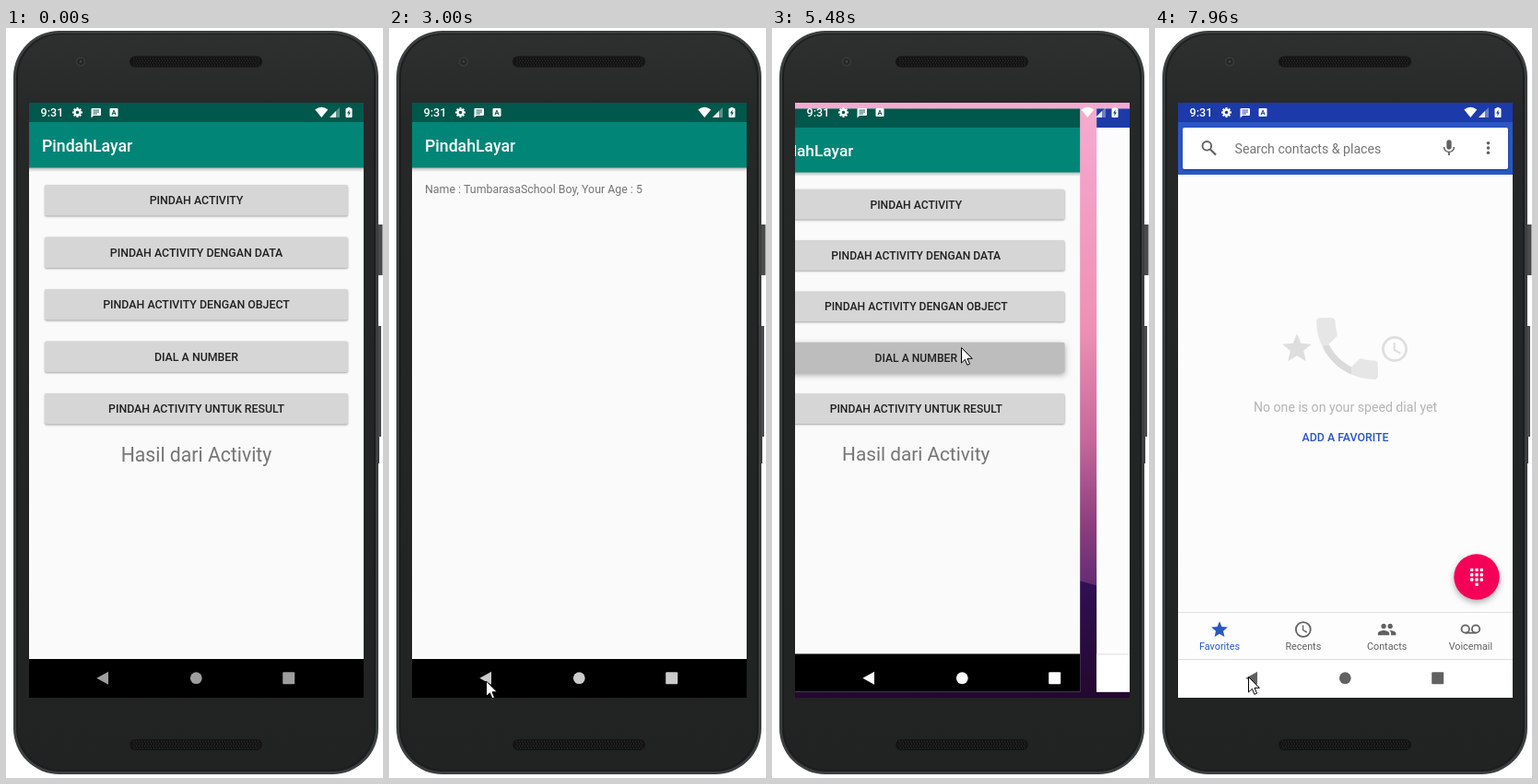
Animation, 409 px wide and 813 px high, one loop 8 s. Source, as an HTML page with a canvas:

```html
<!DOCTYPE html>
<html lang="id">
<head>
<meta charset="utf-8">
<title>Phone demo</title>
<style>
html, body { margin: 0; width: 100%; height: 100%; overflow: hidden; background: #fff; }
canvas { display: block; width: 409px; height: 813px; }
</style>
</head>
<body>
<canvas id="stage"></canvas>
<script>
const W = 409, H = 813, LOOP = 8000;
const SX = 25, SY = 81, SW = 363, SH = 645;
const BLUE = '#2a56c6', GREY = '#616161';
const canvas = document.getElementById('stage');
const ctx = canvas.getContext('2d');
const dpr = window.devicePixelRatio || 1;
canvas.width = W * dpr;
canvas.height = H * dpr;

const ICONS = {
  person: 'M15 12a4 4 0 1 0 0-8 4 4 0 0 0 0 8zM6 10V7H4v3H1v2h3v3h2v-3h3v-2zM15 14c-2.67 0-8 1.34-8 4v2h16v-2c0-2.66-5.33-4-8-4z',
  chat: 'M20 2H4a2 2 0 0 0-2 2v18l4-4h14a2 2 0 0 0 2-2V4a2 2 0 0 0-2-2zM6 9h12v2H6zM18 14H6v-2h12zM18 8H6V6h12z',
  star: 'M12 17.27L18.18 21l-1.64-7.03L22 9.24l-7.19-.61L12 2 9.19 8.63 2 9.24l5.46 4.73L5.82 21z',
  clock: 'M12 2a10 10 0 1 0 0 20 10 10 0 1 0 0-20zM12 4a8 8 0 1 1 0 16 8 8 0 1 1 0-16zM11 7h1.5v5.25l4.5 2.67-.75 1.23L11 13z',
  people: 'M16 11a3 3 0 1 0-3-3 3 3 0 0 0 3 3zM8 11a3 3 0 1 0-3-3 3 3 0 0 0 3 3zM8 13c-2.33 0-7 1.17-7 3.5V19h14v-2.5C15 14.17 10.33 13 8 13zM16 13l-1 .05c1.2.84 2 1.97 2 3.45V19h6v-2.5c0-2.33-4.67-3.5-7-3.5z',
  mic: 'M12 14a3 3 0 0 0 3-3V5a3 3 0 0 0-6 0v6a3 3 0 0 0 3 3zM17.3 11a5.3 5.3 0 0 1-10.6 0H5a7 7 0 0 0 6 6.7V21h2v-3.3a7 7 0 0 0 6-6.7z',
  erase: 'M22 3H7L0 12l7 9h15a2 2 0 0 0 2-2V5a2 2 0 0 0-2-2zM19 15.6 17.6 17 14 13.4 10.4 17 9 15.6 12.6 12 9 8.4 10.4 7 14 10.6 17.6 7 19 8.4 15.4 12z',
  phone: 'M6.62 10.79c1.44 2.83 3.76 5.14 6.59 6.59l2.2-2.2c.27-.27.67-.36 1.02-.24 1.12.37 2.33.57 3.57.57.55 0 1 .45 1 1V20c0 .55-.45 1-1 1-9.39 0-17-7.61-17-17 0-.55.45-1 1-1h3.5c.55 0 1 .45 1 1 0 1.25.2 2.45.57 3.57.11.35.03.74-.25 1.02z',
  pointer: 'M0 0V16.5L3.9 12.8 6.4 18.8 9 17.7 6.5 11.8H11.8z'
};
for (const k in ICONS) ICONS[k] = new Path2D(ICONS[k]);

const clamp = v => Math.max(0, Math.min(1, v));
const span = (t, a, d) => clamp((t - a) / d);
const smooth = u => u * u * (3 - 2 * u);
const easeOut = u => 1 - Math.pow(1 - u, 4);

function rect(x, y, w, h, color) {
  ctx.fillStyle = color;
  ctx.fillRect(x, y, w, h);
}
function round(x, y, w, h, r, color) {
  ctx.fillStyle = color;
  ctx.beginPath();
  ctx.roundRect(x, y, w, h, r);
  ctx.fill();
}
function disc(x, y, r, color) {
  ctx.fillStyle = color;
  ctx.beginPath();
  ctx.arc(x, y, r, 0, 7);
  ctx.fill();
}
function poly(color, ...p) {
  ctx.fillStyle = color;
  ctx.beginPath();
  for (let i = 0; i < p.length; i += 2) ctx.lineTo(p[i], p[i + 1]);
  ctx.fill();
}
function ring(x, y, r, width, color) {
  ctx.strokeStyle = color;
  ctx.lineWidth = width;
  ctx.beginPath();
  ctx.arc(x, y, r, 0, 7);
  ctx.stroke();
}
function line(x1, y1, x2, y2, width, color) {
  ctx.strokeStyle = color;
  ctx.lineWidth = width;
  ctx.beginPath();
  ctx.moveTo(x1, y1);
  ctx.lineTo(x2, y2);
  ctx.stroke();
}
function text(s, x, y, size, color, weight = 400, align = 'left') {
  ctx.font = `${weight} ${size}px Roboto, sans-serif`;
  ctx.textAlign = align;
  ctx.fillStyle = color;
  ctx.fillText(s, x, y);
}
function icon(name, cx, cy, size, color) {
  ctx.save();
  ctx.translate(cx - size / 2, cy - size / 2);
  ctx.scale(size / 24, size / 24);
  ctx.fillStyle = color;
  ctx.fill(ICONS[name], 'evenodd');
  ctx.restore();
}
function shadowed(blur, dy, alpha, paint) {
  ctx.save();
  ctx.shadowColor = `rgba(0,0,0,${alpha})`;
  ctx.shadowBlur = blur * dpr;
  ctx.shadowOffsetY = dy * dpr;
  paint();
  ctx.restore();
}
function clipped(x, y, w, h, paint) {
  ctx.save();
  ctx.beginPath();
  ctx.rect(x, y, w, h);
  ctx.clip();
  paint();
  ctx.restore();
}
function placed(x, y, paint, s = 1) {
  ctx.save();
  ctx.translate(SX + SW / 2 + x, SY + SH / 2 + y);
  ctx.scale(s, s);
  ctx.translate(-SX - SW / 2, -SY - SH / 2);
  paint();
  ctx.restore();
}
function faded(alpha, paint) {
  ctx.save();
  ctx.globalAlpha = alpha;
  paint();
  ctx.restore();
}
function gradient(y1, y2, stops) {
  const g = ctx.createLinearGradient(0, y1, 0, y2);
  stops.forEach(([p, c]) => g.addColorStop(p, c));
  return g;
}
function voicemail(x, y, r, width, color) {
  ring(x - r * 1.35, y, r, width, color);
  ring(x + r * 1.35, y, r, width, color);
  line(x - r * 1.35, y + r, x + r * 1.35, y + r, width, color);
}
function dots(x, y, color) {
  for (let i = -1; i < 2; i++) disc(x, y + i * 5.3, 1.8, color);
}

// Phone body
function speaker(y) {
  round(134, y, 144, 12, 6, '#141414');
  for (let r = 0; r < 4; r++)
    for (let x = 138; x < 275; x += 3) rect(x + r % 2, y + 2 + r * 2.4, 1, 1, '#303030');
}
function drawPhone() {
  rect(0, 0, W, H, '#fff');
  rect(402, 213, 6.5, 55, '#4a4c4c');
  rect(402, 323, 5, 120, '#4a4c4c');
  rect(402, 443, 3, 29, '#3a3c3c');
  round(8, 3, 396, 806, 50, '#3c3f3f');
  round(11, 6, 390, 800, 47, '#1c1d1d');
  round(13, 7, 386, 797, 46, gradient(7, 804, [[0, '#2e2f2f'], [0.12, '#262727'], [1, '#212222']]));
  speaker(30.5);
  speaker(771);
  disc(81, 36.5, 5.3, '#363838');
  disc(81, 36.5, 3.3, '#222424');
  disc(81, 36.5, 1.4, '#404546');
}

// App screens
function frame(status, body, nav) {
  rect(SX, SY, SW, SH, body);
  rect(SX, SY, SW, 21, status);
  rect(SX, 684, SW, 42, nav);
}
function appFrame() {
  frame('#00574b', '#fafafa', '#000');
  rect(SX, 151, SW, 5, gradient(151, 156, [[0, 'rgba(0,0,0,.28)'], [1, 'rgba(0,0,0,0)']]));
  rect(SX, 102, SW, 49.5, '#008577');
  text('PindahLayar', 39, 134, 17.67, '#fff', 500);
}
const BUTTONS = ['PINDAH ACTIVITY', 'PINDAH ACTIVITY DENGAN DATA',
  'PINDAH ACTIVITY DENGAN OBJECT', 'DIAL A NUMBER', 'PINDAH ACTIVITY UNTUK RESULT'];
const PRESSES = [520, 2200, 3640, 5120];

function mainScreen(t) {
  appFrame();
  BUTTONS.forEach((label, i) => {
    const y = 170 + i * 56.5;
    const since = t - PRESSES[i];
    const down = since >= 0 && since < 800 ? smooth(clamp(since / 180)) : 0;
    const c = Math.round(214 - 25 * down);
    shadowed(2 + 4 * down, 1 + 1.5 * down, 0.34, () =>
      round(42, y, 329, 33.5, 2, `rgb(${c},${c},${c})`));
    text(label, 206.5, y + 21.4, 12.36, '#212121', 500, 'center');
  });
  text('Hasil dari Activity', 206.5, 470, 21.2, '#757575', 400, 'center');
}
const PAGES = [
  ['Ini MoveActivity'],
  ['Name : TumbarasaSchool Boy, Your Age : 5'],
  ['Name : TumbarasaSchool,', 'Email : kelas@tumbar.example,', 'Age : 5,', 'Location : Bandung']
];
function page(i) {
  appFrame();
  PAGES[i].forEach((s, n) => text(s, 39, 179 + n * 14.5, 12.36, '#757575'));
}
function blankDialer() {
  frame('#1c3aa9', '#fcfcfc', '#fff');
  rect(SX, 684, SW, 1, '#dedede');
}
const KEYS = ['', 'ABC', 'DEF', 'GHI', 'JKL', 'MNO', 'PQRS', 'TUV', 'WXYZ'];

function dialpad() {
  shadowed(7, -1, 0.3, () => rect(SX, 314, SW, 420, '#fdfdfd'));
  dots(49.5, 341, '#757575');
  text('000555012345', 207, 352, 29.9, '#333', 400, 'center');
  icon('erase', 363.8, 340.7, 21.2, '#757575');
  rect(SX, 367, SW, 1, '#e0e0e0');
  KEYS.forEach((s, i) => {
    const x = 90 + (i % 3) * 116, y = 411 + Math.floor(i / 3) * 56.4;
    text(i + 1, x + (i ? 0 : 1), y, 31.8, BLUE, 300, 'center');
    text(s, x, y + 14.5, 10.6, '#757575', 400, 'center');
  });
  voicemail(90, 421.5, 2.9, 1, '#757575');
  for (let a = 0; a < 5; a++) {
    const r = -Math.PI / 2 + a * Math.PI * 0.4;
    line(90, 573, 90 + 6.5 * Math.cos(r), 573 + 6.5 * Math.sin(r), 1.3, '#8a8a8a');
  }
  text('0', 206, 580, 31.8, BLUE, 300, 'center');
  text('+', 206, 594.5, 10.6, '#757575', 400, 'center');
  text('#', 322, 579.5, 21, '#8a8a8a', 300, 'center');
  shadowed(6, 3, 0.3, () => disc(206.3, 645, 24.7, '#00c853'));
  icon('phone', 206.3, 645, 21.2, '#fff');
}
function contactRows() {
  ['Create new contact', 'Add to a contact', 'Send SMS'].forEach((s, i) => {
    const y = 124 + i * 42.3;
    icon(i < 2 ? 'person' : 'chat', 53, y, 21.2, BLUE);
    text(s, 88.5, y + 5, 14.13, '#212121');
  });
}
function favorites() {
  rect(SX, 102, SW, 57, BLUE);
  shadowed(3, 1, 0.3, () => round(30, 108, 353, 45, 2, '#fff'));
  ring(56.3, 127.8, 4.8, 1.9, GREY);
  line(60, 131.5, 66, 137.5, 2.2, GREY);
  text('Search contacts & places', 86.5, 135.5, 14.13, '#757575');
  icon('mic', 319, 130, 21.2, GREY);
  dots(361.5, 130, GREY);
  icon('star', 154, 347, 38, '#dedede');
  icon('phone', 208.5, 347.5, 89, '#e6e6e6');
  ctx.save();
  ctx.beginPath();
  ctx.arc(236, 321, 47, 0, 7);
  ctx.rect(170, 310, 80, 75);
  ctx.clip('evenodd');
  faded(0.6, () => clipped(183, 344, 30, 34, () => icon('phone', 208.5, 347.5, 89, '#d2d2d2')));
  ctx.restore();
  icon('clock', 260, 348, 33.5, '#dedede');
  text('No one is on your speed dial yet', 206.5, 416, 14.13, '#b4b4b4', 400, 'center');
  text('ADD A FAVORITE', 206.5, 448, 12.36, BLUE, 500, 'center');
  shadowed(6, 3, 0.3, () => disc(349, 595, 24.7, '#f50057'));
  for (let i = 0; i < 10; i++) {
    const col = i < 9 ? i % 3 : 1;
    round(342 + col * 5.3, 585.7 + Math.floor(i / 3) * 5.3, 3.4, 3.4, 1, '#fff');
  }
  rect(SX, 633, SW, 51, '#fdfdfd');
  rect(SX, 633, SW, 1, '#e0e0e0');
  ['Favorites', 'Recents', 'Contacts', 'Voicemail'].forEach((s, i) => {
    const x = 70 + i * 90.8, c = i ? GREY : BLUE;
    if (i < 3) icon(['star', 'clock', 'people'][i], x, 652, 21.2, c);
    else voicemail(x, 651.5, 4.2, 1.8, c);
    text(s, x, 674, 10.8, c, 400, 'center');
  });
}
function dialer(t) {
  blankDialer();
  const show = smooth(span(t, 6490, 160));
  const leave = smooth(span(t, 7320, 280));
  const home = smooth(span(t, 7420, 240));
  clipped(SX, 102, SW, 582, () => {
    faded(show * (1 - home), contactRows);
    faded(home, favorites);
    const y = 413 * (1 - easeOut(span(t, 6490, 280))) + 413 * leave;
    if (y < 412) placed(0, y, dialpad);
  });
  rect(SX, 684, SW, 1, '#dedede');
}
function wallpaper() {
  rect(SX, SY, SW, SH, gradient(SY, 605,
    [[0, '#f5abd0'], [0.47, '#ee90b4'], [0.7, '#c4689a'], [0.87, '#8c3f7e'], [1, '#642b72']]));
  poly(gradient(600, 726, [[0, '#301052'], [1, '#23082f']]),
    SX, 580, 333, 599, 351, 604, 388, 612, 388, 726, SX, 726);
}

// Activity and task transitions
const OPENS = [895, 2545, 3950];
const CLOSES = [1735, 3235, 4635];

function stack(t, i, p) {
  if (p < 1) placed(0, -16 * p, () => mainScreen(t));
  if (p > 0) {
    const y = SY + SH * (1 - p);
    clipped(SX, y, SW, SY + SH - y, () => placed(0, 26 * (1 - p), () => page(i)));
  }
}
function drawWindows(t) {
  rect(SX, SY, SW, SH, '#000');
  if (t >= 5674) return dialer(t);
  if (t >= 5460) {
    const u = span(t, 5423.5, 250), p = smooth(u);
    const s = 1 - 0.03 * Math.sin(Math.PI * u);
    const dist = SW * s + 18;
    wallpaper();
    placed(-dist * p, 0, () => mainScreen(t), s);
    placed(dist * (1 - p), 0, blankDialer, s);
    return;
  }
  let i = 2;
  while (i > 0 && t < OPENS[i]) i--;
  const p = t < CLOSES[i] ? easeOut(span(t, OPENS[i], 400)) : 1 - easeOut(span(t, CLOSES[i], 400));
  stack(t, i, p);
}

// System overlay
function statusIcons(t) {
  const bg = t > 5600 ? '#1c3aa9' : '#00574b';
  text('9:31', 37.5, 96, 12.6, '#fff', 500);
  for (let a = 0; a < 8; a++) {
    const c = Math.cos(a * Math.PI / 4), s = Math.sin(a * Math.PI / 4);
    line(77.5 + 3 * c, 91.5 + 3 * s, 77.5 + 5.5 * c, 91.5 + 5.5 * s, 2, '#fff');
  }
  ring(77.5, 91.5, 3, 2.4, '#fff');
  round(92.5, 87, 10.5, 8, 1, '#fff');
  poly('#fff', 92.5, 94, 96, 94, 92.5, 97.5);
  for (let i = 0; i < 3; i++) rect(94.5, 88.6 + i * 2, i < 2 ? 6.5 : 4.5, 0.9, bg);
  round(112.5, 87, 9, 9, 1, '#fff');
  text('A', 117, 94.3, 7.5, bg, 700, 'center');
  ctx.fillStyle = '#fff';
  ctx.beginPath();
  ctx.moveTo(342.3, 97);
  ctx.lineTo(335.3, 88.4);
  ctx.quadraticCurveTo(342.3, 83.2, 349.3, 88.4);
  ctx.fill();
  poly('rgba(255,255,255,.35)', 351, 97, 362, 97, 362, 86);
  poly('rgba(255,255,255,.85)', 351, 97, 358, 97, 358, 90);
  round(368.5, 87, 7, 10, 1, '#fff');
  rect(370.5, 86, 3, 1.5, '#fff');
  poly(bg, 372.6, 88.5, 370, 92.6, 371.7, 92.6, 371.3, 95.6, 374, 91.5, 372.4, 91.5);
}
const BACKS = [1560, 3080, 4440, 7110];
const NAV_COLORS = [[7360, GREY], [6240, '#8f8f8f'], [6000, '#c0c0c0'], [4800, '#fff'],
  [3400, '#e0e0e0'], [1760, '#cbcbcb'], [0, '#9e9e9e']];

function navIcons(t) {
  for (const b of BACKS) {
    const k = span(t, b, 70) * (1 - span(t, b + 160, 200));
    if (k > 0) {
      const w = 42 + 9 * span(t, b, 70);
      round(105.5 - w / 2, 684, w, 42, 21, t > 6000 ? `rgba(0,0,0,${0.07 * k})` : `rgba(255,255,255,${0.2 * k})`);
    }
  }
  const c = NAV_COLORS.find(n => t >= n[0])[1];
  poly(c, 98.3, 704.7, 111, 697.7, 111, 711.7);
  disc(206.3, 704.7, 6.4, c);
  round(300.2, 698.2, 13, 13, 1, c);
}

// Pointer stops: time, x, y
const STOPS = [[160, 374, 738], [480, 215, 187], [960, 215, 187], [1320, 123, 719], [1760, 123, 719],
  [2120, 212, 246], [2560, 212, 246], [2900, 105, 707], [3220, 105, 709], [3560, 210, 300],
  [4000, 210, 300], [4360, 119, 715], [4660, 119, 715], [5020, 205, 346], [6560, 205, 346],
  [6980, 114, 720], [7480, 114, 720], [7880, 101, 703]];

function drawPointer(t) {
  if (t < STOPS[0][0]) return;
  let i = STOPS.length - 1;
  while (t < STOPS[i][0]) i--;
  const a = STOPS[i], b = STOPS[i + 1] || a;
  const u = b === a ? 0 : smooth(span(t, a[0], b[0] - a[0]));
  const x = a[1] + (b[1] - a[1]) * u, y = a[2] + (b[2] - a[2]) * u;
  if ([...PRESSES, ...BACKS].some(p => t >= p && t < p + 160)) disc(x, y, 12, 'rgba(250,236,25,.62)');
  ctx.save();
  ctx.translate(x + 0.5, y + 0.5);
  ctx.lineJoin = 'round';
  ctx.fillStyle = '#fff';
  ctx.strokeStyle = '#000';
  ctx.lineWidth = 1;
  ctx.fill(ICONS.pointer);
  ctx.stroke(ICONS.pointer);
  ctx.restore();
}

function draw(t) {
  ctx.setTransform(dpr, 0, 0, dpr, 0, 0);
  drawPhone();
  clipped(SX, SY, SW, SH, () => {
    drawWindows(t);
    statusIcons(t);
    navIcons(t);
  });
  drawPointer(t);
}
const start = performance.now();
function tick() {
  draw((performance.now() - start) % LOOP);
  requestAnimationFrame(tick);
}
tick();
</script>
</body>
</html>
```
